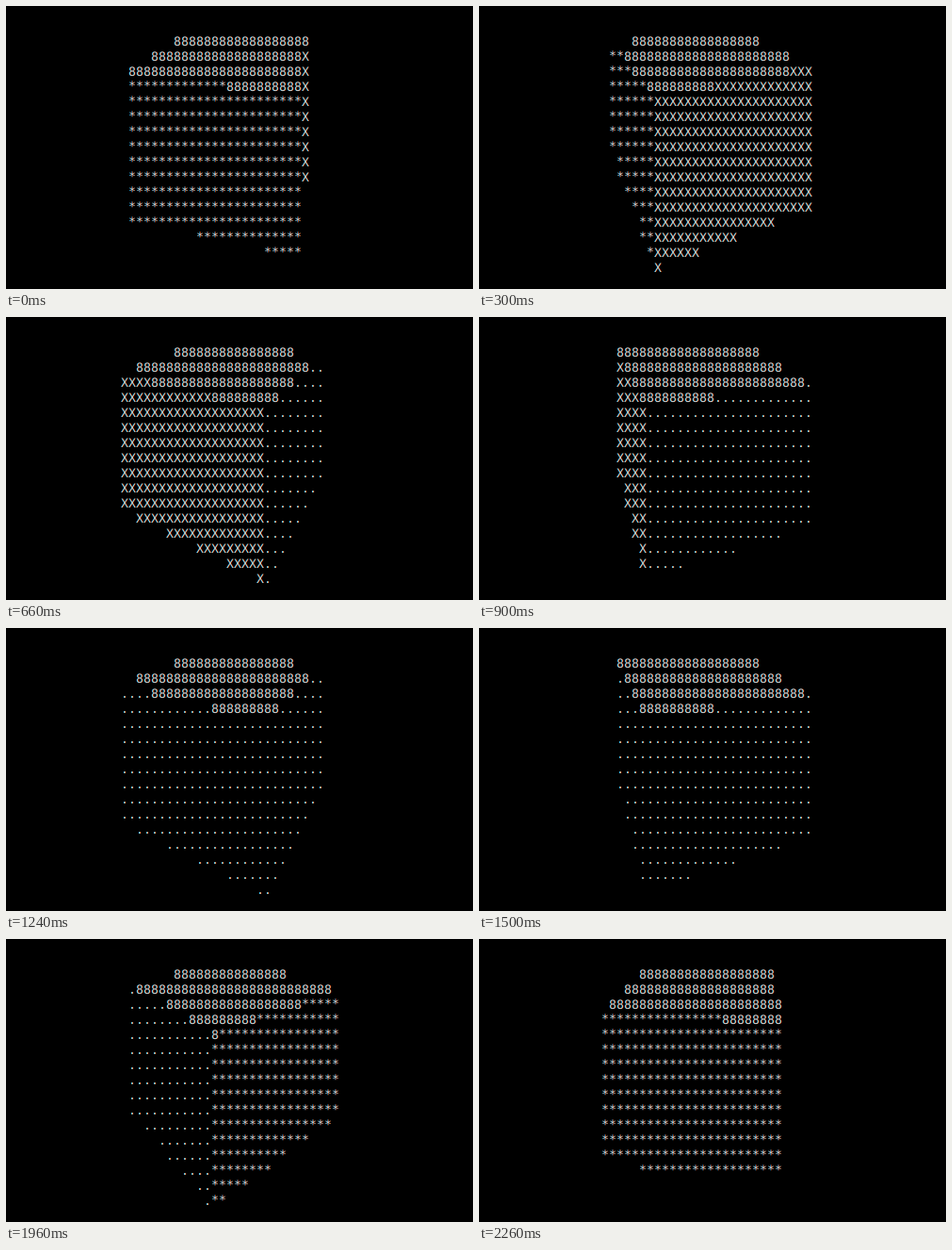
Animation of 496 by 300 pixels, one loop 2.28 s. Source, as an HTML page with a canvas:

```html
<!DOCTYPE html>
<html lang="en">
<head>
<meta charset="utf-8">
<title>ASCII cube</title>
<style>
  html, body { margin: 0; width: 100%; height: 100%; overflow: hidden; background: #000; }
  canvas { display: block; }
</style>
</head>
<body>
<canvas id="stage" width="496" height="300"></canvas>
<script>
const ctx = document.getElementById('stage').getContext('2d', { alpha: false });

const SIDES = 'X..*';
const CELL_W = 8, CELL_H = 16, COLS = 62;

// Subpixel text: each colour channel sits a third of a pixel apart.
const CHANNELS = [['#dc0000', 1 / 3], ['#00dc00', 0], ['#0000dc', -1 / 3]];
const STAR_LIFT = 1;

// Level camera looking over a cube that stands below eye height.
const CX = 237.2, FOCAL = 399, DIST = 3.6;
const HORIZON = -6.52, TOP = 30.2, BOTTOM = 60.35;
const START = 30.6, STEP = 5.583;

// Steps last 40 ms, these ones 20 ms.
const LOOP = 2280, COUNT = 64;
const SHORT = new Set([0, 2, 7, 12, 17, 22, 25, 32, 37, 42, 47, 52, 57, 63]);
const ends = [];
for (let i = 0, t = 0; i < COUNT; i++) ends.push(t += SHORT.has(i) ? 20 : 40);

function corner(deg) {
  const a = deg * Math.PI / 180;
  const w = 1 / (DIST - Math.cos(a));
  return { x: CX + FOCAL * Math.sin(a) * w, w };
}

function put(ch, col, row) {
  const y = 26 + row * CELL_H - (ch === '*' ? STAR_LIFT : 0);
  for (const [color, shift] of CHANNELS) {
    ctx.fillStyle = color;
    ctx.fillText(ch, 6 + col * CELL_W + shift, y);
  }
}

function fillRows(ch, col, from, to) {
  for (let row = Math.ceil(from); row < to; row++) put(ch, col, row);
}

function draw(step) {
  ctx.globalCompositeOperation = 'source-over';
  ctx.fillStyle = '#000';
  ctx.fillRect(0, 0, 496, 300);
  ctx.globalCompositeOperation = 'lighter';
  ctx.font = '13px "DejaVu Sans Mono", monospace';
  ctx.textRendering = 'geometricPrecision';
  ctx.textAlign = 'center';

  const corners = [0, 1, 2, 3].map(i => corner(START - step * STEP + i * 90));

  for (let col = 0; col < COLS; col++) {
    const x = 6 + col * CELL_W;
    let front = 0, back = 0, side = '';
    corners.forEach((p, i) => {
      const q = corners[(i + 1) % 4];
      const t = (x - p.x) / (q.x - p.x);
      if (t < 0 || t > 1) return;
      const w = p.w + (q.w - p.w) * t;
      if (q.x > p.x) {
        front = w;
        side = SIDES[i];
      } else {
        back = w;
      }
    });
    if (!side) continue;
    const rim = HORIZON + TOP * front;
    fillRows('8', col, HORIZON + TOP * back, rim);
    fillRows(side, col, rim, HORIZON + BOTTOM * front);
  }
}

let shown = -1;
const begin = performance.now();
function tick() {
  const t = (performance.now() - begin) % LOOP;
  const step = ends.findIndex(end => t < end);
  if (step !== shown) draw(shown = step);
  requestAnimationFrame(tick);
}
tick();
</script>
</body>
</html>
```
